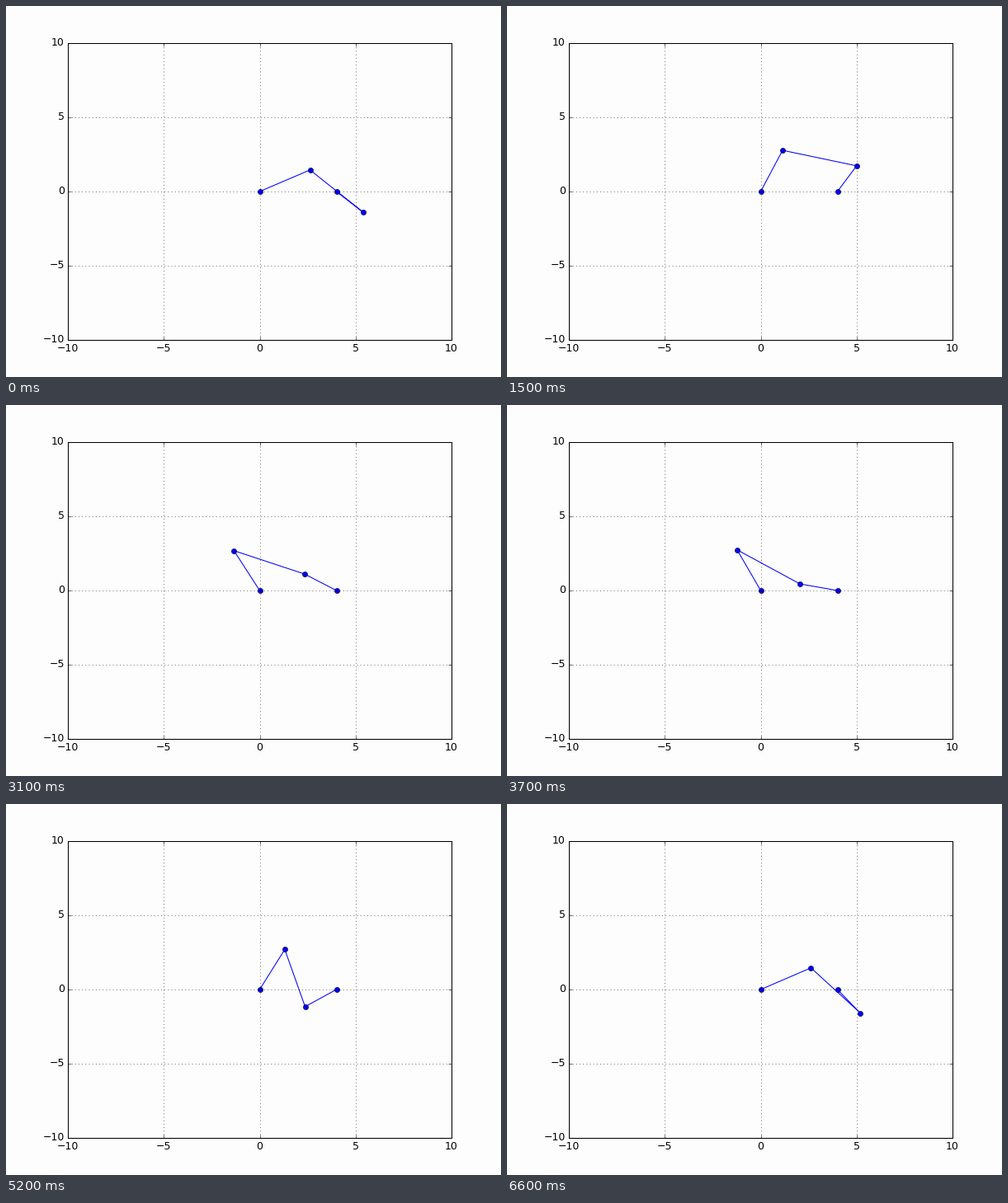
Animation, 600 px wide and 450 px high, one loop 6.7 s. Source, as a matplotlib script:

```python
import numpy as np
import matplotlib.pyplot as plt
from matplotlib.animation import FuncAnimation

FRAMES = 67
CRANK, COUPLER, ROCKER, BASE = 2, 4, 3, 4

plt.rcParams.update({
    "font.family": "DejaVu Sans",
    "font.size": 12,
    "axes.linewidth": 1.0,
    "axes.axisbelow": False,
    "lines.scale_dashes": False,
    "ytick.alignment": "center",
})

# rocker limits: coupler folded over the crank, or stretched along it
LOW, HIGH = (
    np.arccos((ROCKER**2 + BASE**2 - reach**2) / (2 * ROCKER * BASE))
    for reach in (COUPLER - CRANK, COUPLER + CRANK)
)


def linkage(i):
    """Joint positions of the four-bar linkage at step i."""
    u = i / FRAMES
    phase = 2 * np.pi * u + np.radians(1 + 2 * np.sin(np.pi * u))
    theta = (LOW + HIGH) / 2 - (HIGH - LOW) / 2 * np.cos(phase)
    bx, by = ROCKER * np.cos(theta), ROCKER * np.sin(theta)

    # close the triangle between the rocker tip and the crank pivot
    reach = np.hypot(bx - BASE, by)
    cos_beta = (reach**2 + CRANK**2 - COUPLER**2) / (2 * reach * CRANK)
    beta = np.arccos(np.clip(cos_beta, -1, 1))
    side = 1 if np.sin(phase) >= 0 else -1
    psi = np.arctan2(by, bx - BASE) - side * beta
    cx, cy = BASE + CRANK * np.cos(psi), CRANK * np.sin(psi)
    return [0, bx, cx, BASE], [0, by, cy, 0]


fig = plt.figure(figsize=(8, 6), dpi=75, facecolor="#fefdfe")
ax = fig.add_axes([0.125, 0.1, 0.775, 0.8], facecolor="#fefdfe")
ax.set(xlim=(-10, 10), ylim=(-10, 10),
       xticks=range(-10, 11, 5), yticks=range(-10, 11, 5))
ax.tick_params(direction="in", length=4, width=0.5, pad=4,
               top=True, right=True)
ax.grid(color="black", linewidth=0.5, linestyle=(0, (1, 3)))

bars, = ax.plot(*linkage(0), "o-", color="b", linewidth=1, markersize=6,
                markeredgecolor="black", markeredgewidth=0.5)


def update(i):
    bars.set_data(*linkage(i))
    return bars,


anim = FuncAnimation(fig, update, frames=FRAMES, interval=100, repeat=True)
plt.show()
```
